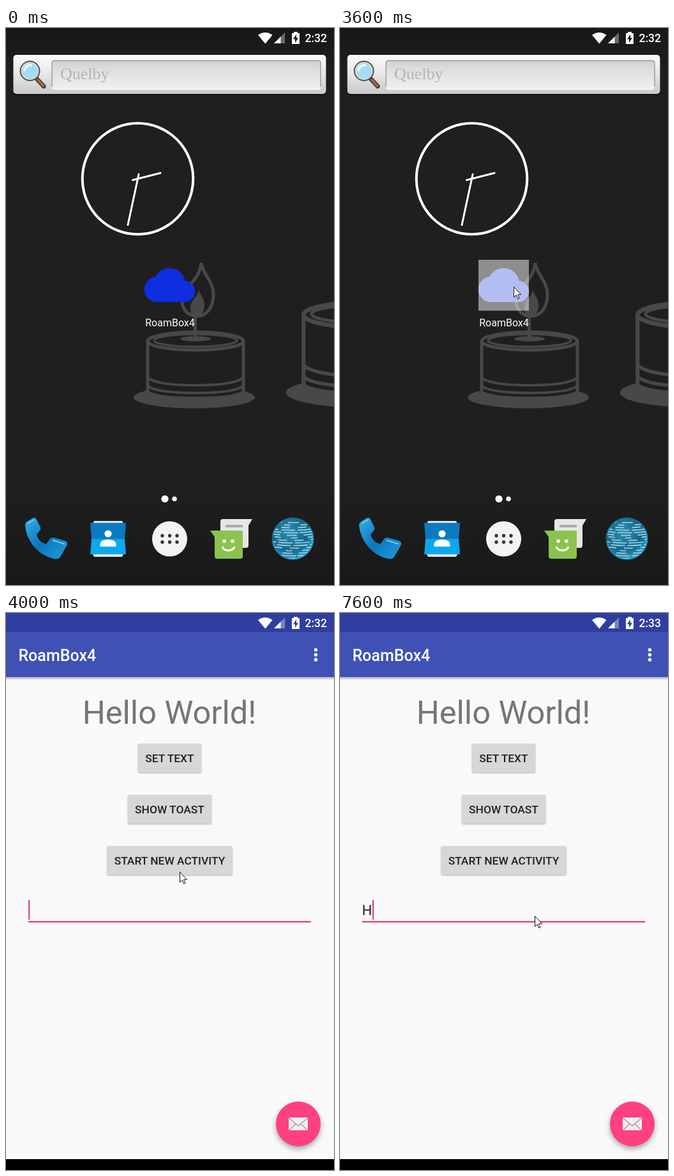
Animation of 514x870 px, one loop 8000 ms. Source, as an HTML page:

```html
<!DOCTYPE html>
<html lang="en">
<head>
<meta charset="utf-8">
<title>Phone demo</title>
<style>
  html, body { margin: 0; width: 100%; height: 100%; overflow: hidden; background: #1f1f1f; }
  svg { display: block; width: 514px; height: 870px; }
  text { font-family: Roboto, "Noto Sans", sans-serif; }
  .mid { text-anchor: middle; }
  .medium { font-weight: 500; }
  .candle { fill: none; stroke: #484848; }
  .candle .solid { fill: #484848; stroke: none; }
  .btn rect { fill: #d6d7d7; filter: drop-shadow(0 1px 1px rgba(0, 0, 0, .3)); }
  .btn text { fill: #212121; font-size: 17.4px; }
  .pink { fill: #e5478d; }
</style>
</head>
<body>
<svg viewBox="0 0 514 870">
  <defs>
    <linearGradient id="scrim" x2="0" y2="1">
      <stop offset="0" stop-opacity=".25"/><stop offset=".08" stop-opacity="0"/>
      <stop offset=".82" stop-opacity="0"/><stop offset="1" stop-opacity=".22"/>
    </linearGradient>
    <linearGradient id="bar" x2="0" y2="1">
      <stop offset="0" stop-color="#fbfbfb"/><stop offset=".5" stop-color="#e6e6e6"/><stop offset="1" stop-color="#c9c9c9"/>
    </linearGradient>
    <linearGradient id="field" x2="0" y2="1">
      <stop offset="0" stop-color="#cfcfcf"/><stop offset=".3" stop-color="#dedede"/><stop offset="1" stop-color="#f0f0f0"/>
    </linearGradient>
    <linearGradient id="handset" x2="1" y2="1">
      <stop offset="0" stop-color="#35aee6"/><stop offset=".5" stop-color="#0b78bb"/><stop offset="1" stop-color="#1d9cdd"/>
    </linearGradient>
    <radialGradient id="sea" cx=".42" cy=".35" r=".65">
      <stop offset="0" stop-color="#2d8db3"/><stop offset=".65" stop-color="#176688"/><stop offset="1" stop-color="#2a9ac6"/>
    </radialGradient>
    <linearGradient id="edge" x2="0" y2="1">
      <stop offset="0" stop-opacity=".3"/><stop offset="1" stop-opacity="0"/>
    </linearGradient>
    <path id="cloud" transform="translate(216.8 361.8) scale(3.31)"
      d="M19.35 10.04C18.67 6.59 15.64 4 12 4 9.11 4 6.6 5.64 5.35 8.04 2.34 8.36 0 10.91 0 14c0 3.31 2.69 6 6 6h13c2.76 0 5-2.24 5-5 0-2.64-2.05-4.78-4.65-4.96z"/>
    <clipPath id="window"><rect id="reveal"/></clipPath>
    <clipPath id="ball"><circle cx="449.5" cy="797.5" r="31.5"/></clipPath>
  </defs>

  <g id="home">
    <rect width="514" height="870" fill="#1f1f1f"/>

    <g class="candle">
      <path stroke-width="5" d="M306 367C307 382 324 395 325 414C326 436 314 450 300 450C284 450 275 438 276 424C277 405 303 396 306 367Z"/>
      <path class="solid" d="M302 407C303 417 312 421 311 435C310 446 304 452 298 452C292 452 288 444 289 435C290 424 302 420 302 407Z"/>
      <path stroke-width="5" d="M296.500 450V485"/>
      <g id="cup">
        <ellipse class="solid" cx="295" cy="577" rx="95" ry="17"/>
        <path fill="#1f1f1f" stroke="none" d="M222 489H372V566Q358 576 297 576T222 566Z"/>
        <ellipse cx="297" cy="489" rx="75" ry="14" stroke-width="5"/>
        <ellipse cx="297" cy="488" rx="65" ry="10" stroke-width="3.500"/>
        <ellipse class="solid" cx="297" cy="485.500" rx="24" ry="4"/>
        <path stroke-width="5" d="M222 489V568M372 489V568"/>
        <path stroke-width="4" d="M222 546Q236 558 297 558T372 546M222 559Q236 570 297 570T372 559"/>
      </g>
      <use href="#cup" transform="translate(560 448) scale(1.25 1.38) translate(-297 -489)"/>
    </g>
    <rect width="514" height="870" fill="url(#scrim)"/>

    <rect x="11" y="44" width="491" height="61" rx="6" fill="#000" opacity=".5"/>
    <rect x="11.500" y="42" width="490" height="61" rx="5" fill="url(#bar)"/>
    <rect x="72" y="51" width="421" height="45" rx="4" fill="url(#field)" stroke="#f8f8f8"/>
    <path d="M72 92V55Q72 51 76 51H489Q493 51 493 55V92" fill="none" stroke="#999" stroke-width="1.500"/>
    <text x="85" y="80" font-size="26" fill="#b4b4b4" style="font-family:'Liberation Serif',serif">Quelby</text>
    <g fill="none" stroke-linecap="round">
      <path d="M47 78L59 91" stroke="#333" stroke-width="7"/>
      <path d="M50 81L58.500 90.500" stroke="#b0654f" stroke-width="4"/>
      <circle cx="37.500" cy="67" r="14.500" fill="#a5dcf3" stroke="#555" stroke-width="3"/>
      <circle cx="37.500" cy="67" r="13" stroke="#d9d9d9" stroke-width="2"/>
      <path d="M29 66Q30 58 39 58" stroke="#e4f7fe" stroke-width="4"/>
    </g>

    <g fill="none" stroke="#fff" stroke-linecap="round">
      <circle cx="206.500" cy="235.500" r="86.800" stroke-width="4"/>
      <path stroke-width="3" d="M198.500 237.500L242 226.500M208 228.500L191 307.500"/>
    </g>

    <use href="#cloud" fill="#0e2ee0"/>
    <use href="#cloud" fill="#fff" id="press"/>
    <text class="mid" x="257" y="465.500" font-size="16" fill="#fff">RoamBox4</text>

    <circle cx="249" cy="735.500" r="5.600" fill="#fff"/>
    <circle cx="264" cy="735.500" r="3.800" fill="#f4f4f4"/>

    <path fill="url(#handset)" d="M43 765Q46 764 48 768L54 780Q55 783 53 785L48 791C50 799 55 804 63 806L69 798Q71 795 75 796L93 801Q97 803 96 807L85 826Q82 830 76 829C53 825 32 803 30 777Q30 773 33 771Z"/>
    <path fill="none" stroke="#6fcbf2" stroke-width="2" d="M34 774L44 768M73 800L92 806"/>

    <path fill="#e3e3e3" d="M138 770H182L186 778H134ZM134 818H186L182 826H138Z"/>
    <path fill="#0b7ac1" d="M132 773H188L186 798H134Z"/>
    <path fill="#0ba7f1" d="M134 798H186L188 822H132Z"/>
    <g fill="#fff"><circle cx="160" cy="790" r="5.600"/><path d="M147.500 810V806Q148 799 160 799T172.500 806V810Z"/></g>

    <circle cx="256.500" cy="798" r="27.500" fill="#f3f3f3"/>
    <g id="dots" fill="#333"></g>

    <path fill="#e6e6e6" d="M340 767H386L380 777V808Q380 812 376 812H340Q336 812 336 808V771Q336 767 340 767Z"/>
    <path stroke="#aaa" stroke-width="4" d="M344 778H371M344 787H371"/>
    <path fill="#8bc34f" d="M320 785H367Q371 785 371 789V825Q371 829 367 829H331Q327 829 327 825V795Z"/>
    <g fill="#fff"><circle cx="342" cy="801.500" r="2.800"/><circle cx="355" cy="801.500" r="2.800"/></g>
    <path fill="none" stroke="#fff" stroke-width="3" d="M339 810Q341 816 348.500 816T358 810"/>

    <circle cx="449.500" cy="797.500" r="33" fill="url(#sea)"/>
    <g id="land" clip-path="url(#ball)" fill="none" stroke="#9ed4e6" stroke-width="1.700"></g>
  </g>

  <g id="app" clip-path="url(#window)">
    <rect id="cover" width="514" height="870" fill="#f9f9f9"/>
    <g id="page">
      <rect width="514" height="854" fill="#faf9f9"/>
      <rect y="853" width="514" height="17"/>
      <rect width="514" height="30" fill="#303f9f"/>
      <rect y="100" width="514" height="5" fill="url(#edge)"/>
      <rect y="30" width="514" height="70" fill="#3f51b5"/>
      <text class="medium" x="19.500" y="75" font-size="25" fill="#fff">RoamBox4</text>
      <g fill="#fff"><circle cx="485.500" cy="57.500" r="2.700"/><circle cx="485.500" cy="65.300" r="2.700"/><circle cx="485.500" cy="73" r="2.700"/></g>
      <text class="mid" x="256" y="173" font-size="50.500" fill="#757575">Hello World!</text>
      <g id="buttons"></g>
      <text id="typed" x="34.500" y="472" font-size="22" fill="#212121">H</text>
      <rect id="caret" class="pink" y="448" width="2.300" height="31"/>
      <rect class="pink" x="35" y="481" width="443" height="2.500"/>
      <circle cx="458" cy="798" r="35" fill="#ff4081" style="filter:drop-shadow(0 4px 4px rgba(0,0,0,.35))"/>
      <rect x="443" y="788" width="30" height="20" rx="1.500" fill="#efefef"/>
      <path fill="none" stroke="#b3929f" stroke-width="1.500" d="M443.500 789L458 801L472.500 789M444 807.500L454 798M472 807.500L462 798"/>
    </g>
  </g>

  <g fill="#fff">
    <path d="M395 11Q406 3 417.500 11L406.300 24.500Z"/>
    <path opacity=".35" d="M437 7V24H420Z"/>
    <path d="M430.500 13.500V24H420Z"/>
    <path fill-rule="evenodd" d="M451 8V6H457V8H460V25H448V8ZM455 10L450 17.500H453V23L458 15.500H455Z"/>
    <text class="medium" id="time" x="468.500" y="22" font-size="17.500"></text>
  </g>
  <path id="pointer" d="M.5.5V16.500L4.200 13.200L6.700 19L9 18L6.500 12.300H11.500Z" fill="#fff" stroke="#111" stroke-linejoin="round"/>
</svg>

<script>
const LOOP = 8000, STEP = 100;
const $ = id => document.getElementById(id);

function set(id, attrs) {
  for (const name in attrs) $(id).setAttribute(name, attrs[name]);
}

// latest row whose time has come
const at = (rows, t) => rows.filter(row => row[0] <= t).pop();

// time, x, y of the pointer tip
const pointerPath = [
  [0, -40, -40], [1200, 13, 696], [1300, 71, 680], [1400, 124, 650], [1500, 174, 617], [1600, 218, 564],
  [1800, 245, 500], [1900, 266, 452], [2000, 276, 431], [2100, 277, 424], [2200, 276, 417],
  [2300, 274, 411], [2400, 273, 406], [2500, 272, 404],
  [4700, 268, 408], [4800, 262, 412], [5200, 276, 413], [5300, 305, 416], [5500, 331, 408],
  [5700, 367, 416], [5900, 384, 440], [6000, 376, 458], [6100, 360, 471],
  [6400, 330, 473], [6500, 311, 473], [6600, 305, 473]
];

// time, left, top, right, bottom, cover opacity, page opacity, page shift
const windowSteps = [
  [0, 0, 0, 0, 0, 0, 0, 0],
  [3600, 217, 362, 296, 441.5, .51, 0, 20],
  [3700, 29, 197, 484, 636, 1, 0, 16],
  [3800, 0, 46, 514, 854, 1, .54, 8],
  [3900, 0, 6, 514, 866, 1, .88, 2],
  [4000, 0, 0, 514, 870, 1, 1, 0]
];

const caretSteps = [
  [0, 1], [4300, 0], [4800, 1], [5300, 0], [5700, 1], [6100, 0], [6500, 1], [6800, 0], [7200, 1]
];

function build() {
  const labels = [["SET TEXT", 99], ["SHOW TOAST", 131], ["START NEW ACTIVITY", 196]];
  $("buttons").innerHTML = labels.map(([label, w], i) =>
    `<g class="btn" transform="translate(256.500 ${204 + 80 * i})">
      <rect x="${-w / 2}" width="${w}" height="45" rx="2"/>
      <text class="mid medium" y="29.300">${label}</text></g>`).join("");

  for (let i = 0; i < 6; i++) {
    $("dots").innerHTML += `<circle cx="${245 + 11.5 * (i % 3)}" cy="${i < 3 ? 793 : 803}" r="2.700"/>`;
  }
  for (let i = 0; i < 15; i++) {
    const y = 770 + i * 4, gap = 9 + 7 * Math.sin(i * 1.3);
    $("land").innerHTML += `<path stroke-dasharray="${26 - gap} ${gap}" stroke-dashoffset="${11 * Math.sin(i * .6)}"
      d="M416 ${y}Q449 ${y + 5} 483 ${y}"/>`;
  }
}

function draw() {
  const t = Math.floor(performance.now() % LOOP / STEP) * STEP;

  const [, px, py] = at(pointerPath, t);
  set("pointer", { transform: `translate(${px} ${py})` });

  const press = Math.min(1, Math.max(0, (t - 3100) / 400));
  set("press", { opacity: .38 * press });

  const [, x, y, right, bottom, cover, page, shift] = at(windowSteps, t);
  set("reveal", { x, y, width: right - x, height: bottom - y });
  set("cover", { opacity: cover });
  set("page", { opacity: page, transform: `translate(0 ${shift})` });

  const typed = t >= 7600;
  set("typed", { opacity: +typed });
  set("caret", { x: typed ? 50.7 : 35, opacity: at(caretSteps, t)[1] });

  $("time").textContent = t < 6500 ? "2:32" : "2:33";
  requestAnimationFrame(draw);
}

build();
draw();
</script>
</body>
</html>
```
